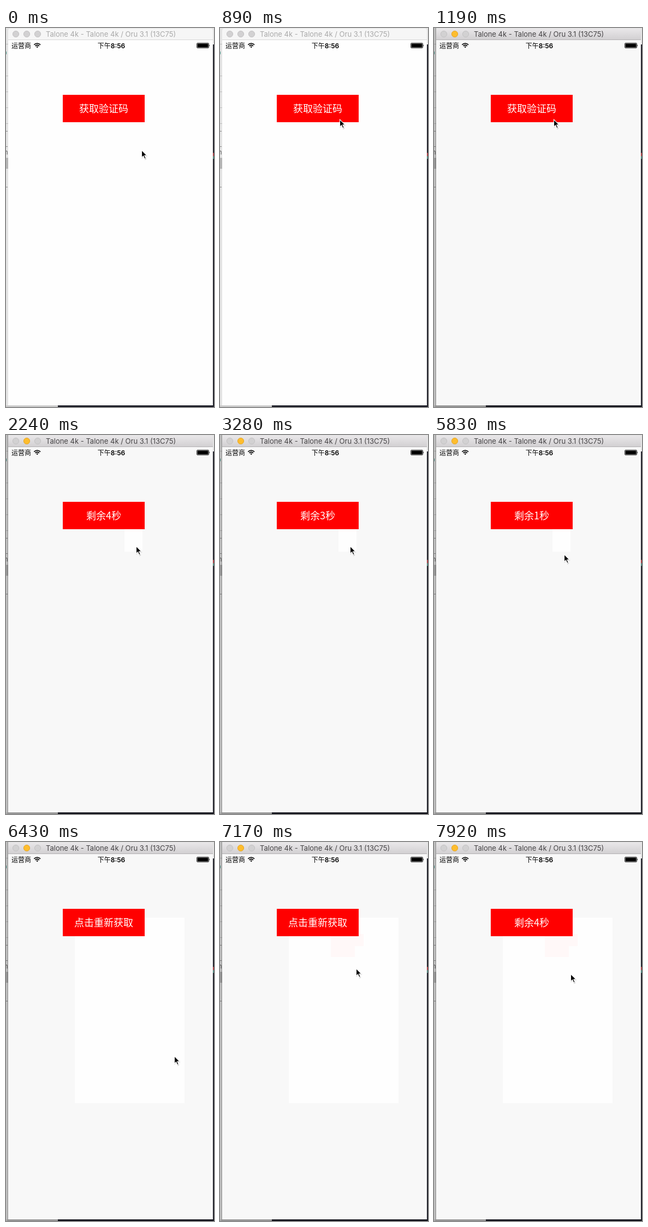
An HTML page that plays this animation: 381 by 692 pixels, repeating every 8 s.

```html
<!DOCTYPE html>
<html lang="zh">
<head>
<meta charset="utf-8">
<style>
  html, body { margin: 0; width: 100%; height: 100%; overflow: hidden; background: #ddd; }
  svg { display: block; width: 381px; height: 692px; }
  .cjk { font-family: "Noto Sans CJK SC", "Noto Sans CJK", sans-serif; }
  .title { font: 13px Inter, sans-serif; }
  .status { font-size: 12px; }
  .label { font-size: 18px; font-weight: 300; fill: #fff; text-anchor: middle; }
</style>
</head>
<body>
<svg viewBox="0 0 381 692">
  <defs>
    <linearGradient id="activeBar" x2="0" y2="1">
      <stop stop-color="#e9e7e9"/><stop offset="1" stop-color="#d1cfd1"/>
    </linearGradient>
    <linearGradient id="edgeShade">
      <stop stop-color="#000" stop-opacity=".1"/><stop offset="1" stop-color="#000" stop-opacity=".32"/>
    </linearGradient>
  </defs>

  <!-- desktop behind the window -->
  <rect width="381" height="692" fill="#e4e4e4"/>
  <g stroke="#bdbdbd">
    <path d="M0 29.5H4M0 87.5H4M0 116.5H4M0 145.5H4M0 174.5H4"/>
    <path d="M0 188.5H3M0 216.5H3M0 290.5H3" stroke="#888"/>
  </g>
  <rect y="237" width="4" height="20" fill="#b5b5b5"/>
  <text x="-3" y="231" font-family="Inter, sans-serif" font-size="11" fill="#555">n</text>
  <rect y="43" width="1" height="5" fill="#4a9a8c"/>
  <rect x="379" y="30" width="2" height="662" fill="#20212a"/>
  <rect x="379" y="228" width="2" height="6" fill="#a33c42"/>
  <rect x="379" y="234" width="2" height="5" fill="#4c8078"/>
  <rect y="689" width="95" height="3" fill="#cbcbcb"/>
  <rect x="95" y="689" width="286" height="3" fill="#20212a"/>
  <g id="shade">
    <rect width="4" height="692" fill="url(#edgeShade)"/>
    <rect x="4" y="689" width="377" height="3" opacity=".25"/>
  </g>

  <!-- simulator window -->
  <path id="bar" d="M4 22V5Q4 1 8 1H375Q379 1 379 5V22Z"/>
  <rect id="barLine" x="4" y="21" width="375" height="1"/>
  <g fill="#d2d1d2" stroke="#c3c2c3">
    <circle cx="18" cy="11" r="5.6"/>
    <circle id="middleDot" cx="38" cy="11" r="5.6"/>
    <circle cx="58" cy="11" r="5.6"/>
  </g>
  <text id="title" class="title" x="73" y="16">Talone 4k - Talone 4k / Oru 3.1 (13C75)</text>
  <rect id="screen" x="4" y="22" width="375" height="667"/>

  <g class="cjk status">
    <text x="10" y="36.5">运营商</text>
    <text x="193" y="36.5" font-weight="500" text-anchor="middle">下午<tspan font-family="Inter, sans-serif" font-weight="600">8:56</tspan></text>
  </g>
  <g fill="none" stroke="#000" stroke-width="1.7">
    <path d="M51.3 30.6Q57.2 25.6 63.1 30.6M53.5 32.8Q57.2 29.7 60.9 32.8"/>
    <path d="M55.3 34.2Q57.2 32.8 59.1 34.2L57.2 36.3Z" fill="#000" stroke="none"/>
  </g>
  <rect x="349.5" y="27.5" width="22" height="9" rx="1.5" fill="none" stroke="#000" stroke-width=".8"/>
  <rect x="350.5" y="28.5" width="20" height="7" rx=".6"/>
  <path d="M372.4 30.3Q374.2 32 372.4 33.7Z"/>

  <rect id="smallPatch" x="217" y="166" width="33" height="47" fill="#fefefe"/>
  <rect id="largePatch" x="126" y="138" width="201" height="339" fill="#fefefe"/>
  <path id="pinkPatch" d="M203 168H263V190H247V210H203Z" fill="#fff8f8"/>

  <rect x="104" y="122" width="150" height="50" fill="#f00"/>
  <text id="label" class="cjk label" x="179" y="153.5"></text>

  <g id="cursor">
    <path d="M0 0V15.5L3.5 12.3L6 18L9 16.8L6.6 11.2H11.3Z" transform="translate(.4 1)" opacity=".18"/>
    <path d="M.5 1V14.4L3.6 11.6L6 17L8.2 16L5.9 10.7H10Z" stroke="#fff" stroke-width="1.1"/>
  </g>
</svg>
<script>
const LOOP = 8000;
const ACTIVATE = 1190;
const byId = id => document.getElementById(id);

// [start time, tip x, tip y]
const cursorSteps = [
  [0, 248, 222], [150, 246, 216], [300, 240, 204], [450, 232, 189],
  [600, 225, 176], [750, 221, 169], [890, 219, 166],
  [1490, 238, 194], [1640, 239, 199], [1790, 239, 201], [1940, 238, 202],
  [5830, 238, 217], [5980, 252, 280], [6130, 288, 395], [6280, 315, 457],
  [6430, 308, 390], [6580, 204, 191],
  [6880, 235, 146], [7030, 251, 171], [7170, 249, 230], [7320, 250, 236], [7470, 250, 240]
];
const labelSteps = [
  [0, "获取验证码"], [2240, "剩余4秒"], [3280, "剩余3秒"], [4180, "剩余2秒"],
  [5230, "剩余1秒"], [6280, "点击重新获取"], [7920, "剩余4秒"]
];

const at = (steps, t) => steps.findLast(([start]) => start <= t).slice(1);
const paint = (id, color) => byId(id).setAttribute("fill", color);
const show = (id, visible) => byId(id).setAttribute("visibility", visible ? "visible" : "hidden");

function render(t) {
  const active = t >= ACTIVATE;
  paint("bar", active ? "url(#activeBar)" : "#f6f6f6");
  paint("barLine", active ? "#b3b1b3" : "#d6d6d6");
  paint("title", active ? "#464446" : "#a9a9a9");
  paint("screen", active ? "#f8f8f8" : "#fefefe");
  paint("middleDot", active ? "#fdbd2e" : "#d2d1d2");
  byId("middleDot").setAttribute("stroke", active ? "#e5a62b" : "#c3c2c3");
  show("shade", active);
  show("smallPatch", t >= 1490);
  show("largePatch", t >= 6280);
  show("pinkPatch", t >= 6880);
  byId("label").textContent = at(labelSteps, t)[0];
  byId("cursor").setAttribute("transform", `translate(${at(cursorSteps, t)})`);
}

const begin = performance.now();
function tick() {
  render((performance.now() - begin) % LOOP);
  requestAnimationFrame(tick);
}
tick();
</script>
</body>
</html>
```
